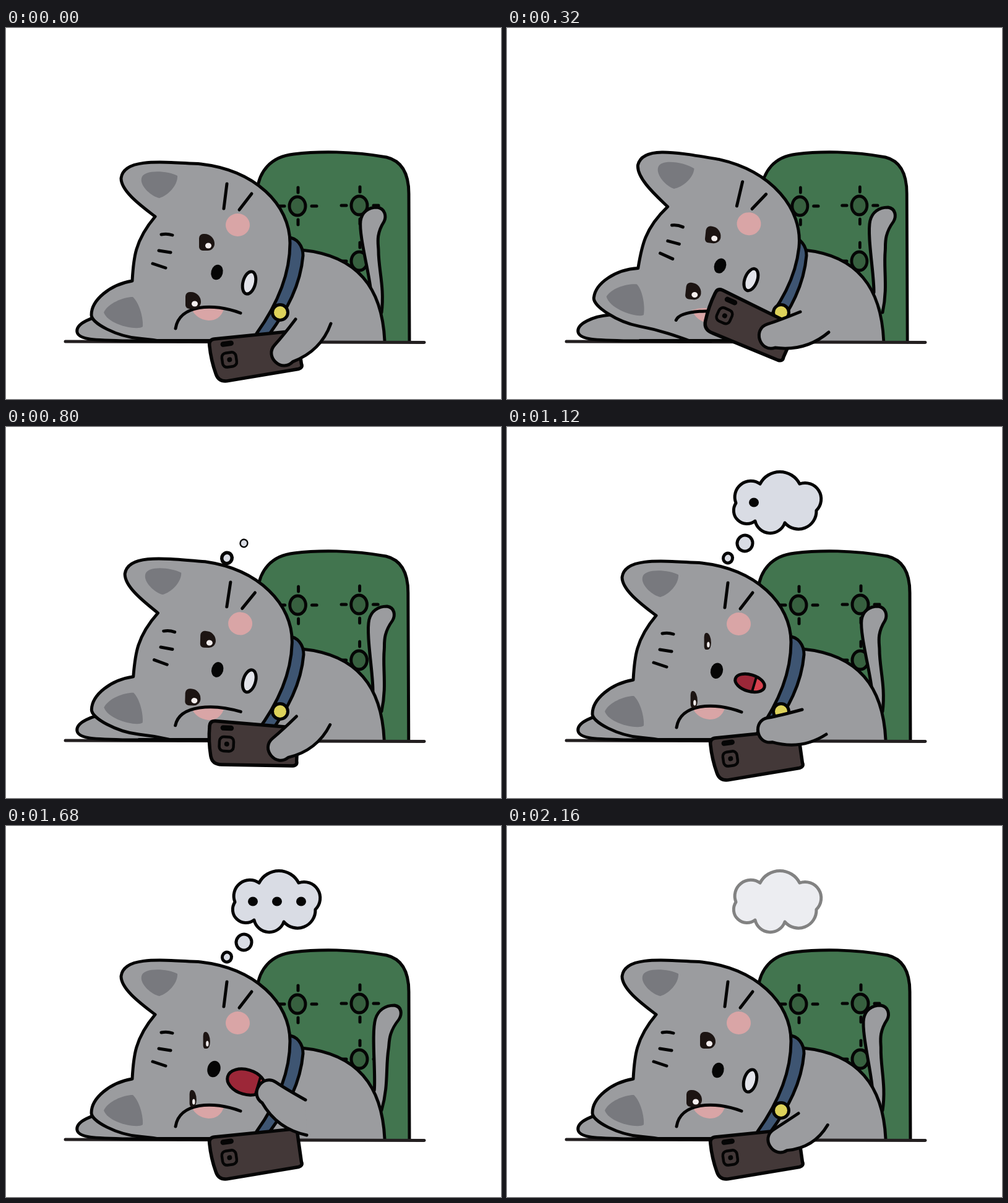
Write an HTML page with a canvas that moves like this. It is 800x600 px and loops after 2240 ms.

```html
<!DOCTYPE html>
<html lang="en">
<head>
<meta charset="utf-8">
<title>Sleepy cat</title>
<style>
html, body { margin: 0; width: 100%; height: 100%; overflow: hidden; background: #fff; }
canvas { display: block; }
</style>
</head>
<body>
<canvas id="stage" width="800" height="600"></canvas>
<script>
const LOOP = 2240, STEP = 80, TAU = Math.PI * 2;
const INK = '#050505', FUR = '#9b9c9f', EAR = '#78797e', GREEN = '#42754f', MOSS = '#37603f',
  BLUE = '#3e5572', GOLD = '#ddd25a', CASE = '#433838', MIST = '#d9dce4', PINK = '#d9a5a6';
const c = document.getElementById('stage').getContext('2d');

const ramp = (t, from, to) => Math.min(1, Math.max(0, (t - from) / (to - from)));
const mix = (a, b, u) => a + (b - a) * u;

// Grows from 0 to 1 within 200 ms, slightly overshooting
function pop(t, start) {
  const u = ramp(t, start, start + 200);
  return u && 1 + 2.7 * (u - 1) ** 3 + 1.7 * (u - 1) ** 2;
}

function paint(path, fill, width = 5) {
  if (fill) { c.fillStyle = fill; c.fill(path); }
  if (width) { c.strokeStyle = INK; c.lineWidth = width; c.stroke(path); }
}
const shape = (d, fill, width) => paint(new Path2D(d), fill, width);

function oval(x, y, rx, ry, fill, width = 0, turn = 0) {
  const p = new Path2D();
  p.ellipse(x, y, rx, ry, turn, 0, TAU);
  paint(p, fill, width);
  return p;
}

function box(x, y, w, h, radius, fill, width) {
  const p = new Path2D();
  p.roundRect(x, y, w, h, radius);
  paint(p, fill, width);
}

function group(draw) { c.save(); draw(); c.restore(); }

function scaleAt(x, y, sx, sy) {
  c.translate(x, y);
  c.scale(sx, sy);
  c.translate(-x, -y);
}

function button(x, y) {
  oval(x, y, 13, 15, MOSS, 5);
  for (let i = 0; i < 4; i++) group(() => {
    c.translate(x + 1, y);
    c.rotate(i * TAU / 4);
    shape('M22 0h8');
  });
}

function chair() {
  shape('M652 508L651 268C651 235 640 215 615 209C560 199 505 199 465 204C427 208 409 233 406 262V508', GREEN);
  button(471, 288);
  button(571, 287);
  button(571, 377);
}

function tail(sway) {
  // Lean grows with height above the base
  c.transform(1, 0, -sway / 160, 1, sway * 460 / 160, 0);
  shape('M590 428C588 400 570 335 573 312C575 298 585 290 600 290C613 292 615 305 611 313' +
    'C597 335 602 350 602 360C602 390 612 420 607 460', FUR);
}

function body() {
  const back = 'M478 359C568 368 608 420 612 506';
  shape(back + 'H400L440 355Z', FUR, 0);
  shape(back);
}

function eye(x, y, open) {
  c.translate(x, y);
  c.scale(open, 1);
  box(-12, -14, 25, 27, [7, 16, 11, 6], '#1c1412', 0);
  oval(3, 5, 5, 4.5, '#f4eeee');
}

function mouth(yawn) {
  if (yawn < .2) return oval(393, 412, 10, 18.5, '#e3e4ea', 5, .26);
  const rx = 20 + 11 * yawn, ry = 9 + 11 * yawn, edge = 21.5 * yawn - 1.5;
  c.translate(395.7 - 7.7 * yawn, 414);
  c.rotate(.29);
  group(() => {
    c.clip(oval(0, 0, rx, ry, '#9c2738'));
    shape(`M${edge}-40h60v80h-60Z`, '#d8424f', 0);
    shape(`M${edge}-40v80`, null, 4);
  });
  oval(0, 0, rx, ry, null, 5);
}

function head(lean, yawn, open) {
  // Everything below the table top is hidden
  c.beginPath();
  c.rect(0, 0, 800, 507);
  c.clip();
  c.translate(400, 472);
  c.rotate(.1065 * lean);
  c.translate(-400, -472);
  shape('M241 305C222 290 186 265 186 243C190 211 245 216 315 220C402 230 459 285 459 348C459 395 440 445 405 494' +
    'L400 530L330 524C300 518 265 506 215 502C180 499 138 478 138 464C138 440 168 415 204 409C206 375 207 345 241 305Z', FUR);
  shape('M219 243C222 228 262 231 277 239C278 254 262 271 248 275C236 273 216 256 219 243Z', EAR, 0);
  shape('M158 460C165 445 190 435 205 435C216 445 222 470 221 483C212 490 165 480 158 460Z', EAR, 0);
  shape('M357 252L352 292M397 268L377 294M251 334Q260 332 269 335M247 360L266 363M237 381L258 388');
  oval(374.5, 318.5, 19.5, 18.5, PINK);
  group(() => {
    c.translate(-2 * lean, 12 * lean);
    shape('M300 455Q325 444 352 455Q346 473 327 473Q308 471 300 455Z', PINK, 0);
  });
  shape(`M274 486C280 ${447 + 20 * lean} 335 ${444 + 20 * lean} 379 461`);
  c.translate(-5.5 * lean, -4 * lean);
  group(() => eye(324, 347, open));
  group(() => eye(302, 441, open));
  oval(341 - 5 * yawn, 395 - 2 * yawn, 9.5 + yawn, 12.5 + yawn, INK, 0, .25);
  group(() => mouth(yawn));
}

function phone(raise) {
  c.translate(403 - 13 * raise, 531 - 48 * raise);
  c.rotate((-8 + 32 * raise) * Math.PI / 180);
  shape('M-62-37L66-32Q72-31 72-25V22Q74 29 66 30L-48 33Q-64 34-67 20Q-72-4-71-28Q-71-37-62-37Z', CASE, 5.5);
  shape('M-49-26.5h13', null, 8.5);
  box(-54, -12, 23, 23, 7, null, 4.5);
  oval(-42, -.5, 4, 4, INK);
}

function bubble(x, y, r, size, alpha) {
  c.globalAlpha = alpha;
  c.translate(x, y);
  c.scale(size, size);
  if (size) oval(0, 0, r, r + .5, MIST, 5, .3);
}

function cloud(size, alpha) {
  if (!size) return;
  scaleAt(438, 122, size, size);
  // Each lobe is an arc [end x, end y, radius]
  const lobes = [[409, 92, 26], [473, 92, 36], [500, 135, 26], [449, 155, 29], [401, 152, 25], [370, 123, 21.5]];
  shape('M370 123' + lobes.map(([x, y, r]) => `A${r} ${r} 0 0 1 ${x} ${y}`).join('') + 'Z', MIST);
  c.globalAlpha = 1 - alpha;
  c.fillStyle = '#fff';
  c.fillRect(350, 60, 180, 120);
}

function thought(t) {
  group(() => bubble(357, 212, 7.5, pop(t, 680), 1 - ramp(t, 1680, 1920)));
  group(() => bubble(384.5, 188, 12.5, pop(t, 776), 1 - ramp(t, 1920, 2080)));
  group(() => cloud(pop(t, 880), 1 - ramp(t, 2080, 2240)));
  for (let i = 0; i < 3; i++)
    if (t >= 1120 + 160 * i && t < 1760 + 120 * i) oval(399 + 39 * i, 122, 8, 7.5, INK);
}

// [time, upper end x, y, paw centre x, y, lower end x, y]
const REACH = [
  [0, 468, 471, 449, 526, 525, 478],
  [320, 474, 459, 427, 498, 520, 492],
  [560, 474, 459, 427, 498, 520, 492],
  [880, 468, 471, 449, 526, 525, 478],
  [1120, 477, 457, 425, 490, 516, 497],
  [1440, 484, 443, 425, 431, 486, 500],
  [1680, 484, 443, 425, 431, 486, 500],
  [1920, 480, 446, 420, 453, 498, 500],
  [LOOP, 468, 471, 449, 526, 525, 478]
];

// A round paw whose two sides run back to the ends of the sleeve
function paw(t) {
  const i = REACH.findIndex(k => k[0] > t), from = REACH[i - 1], to = REACH[i];
  const u = ramp(t, from[0], to[0]);
  const [, ax, ay, x, y, bx, by] = from.map((v, j) => mix(v, to[j], u));
  const angle = Math.atan2(y - (ay + by) / 2, x - (ax + bx) / 2);
  const r = 20, dx = r * Math.cos(angle), dy = r * Math.sin(angle);
  const ux = x - dy, uy = y + dx, lx = x + dy, ly = y - dx;
  const p = new Path2D();
  p.moveTo(ax, ay);
  p.quadraticCurveTo(ux - dx, uy - dy, ux, uy);
  p.bezierCurveTo(ux + dx * 1.3, uy + dy * 1.3, lx + dx * 1.3, ly + dy * 1.3, lx, ly);
  p.quadraticCurveTo((lx + bx) / 2 + dy, (ly + by) / 2 - dx, bx, by);
  paint(p, FUR);
}

function draw(t) {
  const lean = ramp(t, 0, 320) - ramp(t, 560, 880);
  const yawn = ramp(t, 900, 1440) - ramp(t, 1720, 2120);
  const open = 1 - .55 * (ramp(t, 880, 1120) - ramp(t, 1680, 2000));
  const sway = 26 * (1 - Math.abs(t % 1120 / 560 - 1));
  const squeeze = 1 - .04 * lean;
  c.fillStyle = '#fff';
  c.fillRect(0, 0, 800, 600);
  c.lineCap = c.lineJoin = 'round';
  group(() => { scaleAt(531, 0, squeeze, 1); chair(); });
  group(() => tail(sway));
  group(() => { scaleAt(531, 0, squeeze, 1); body(); });
  group(() => {
    c.translate(4 * lean, 0);
    shape('M456 339C470 339 480 352 480 368C476 415 455 455 425 496L400 497L440 420Z', BLUE);
  });
  c.strokeStyle = '#231f20';
  c.lineWidth = 5;
  c.stroke(new Path2D('M96 507L676 508.5'));
  shape('M166 464C140 466 112 478 115 492C118 504 140 505 200 506H330', FUR);
  group(() => head(lean, yawn, open));
  shape('M215 505.5H395');
  oval(443, 460, 12.5, 12.5, GOLD, 5);
  group(() => phone(lean ** .8));
  paw(t);
  thought(t);
}

function tick() {
  draw(Math.floor(performance.now() % LOOP / STEP) * STEP);
  requestAnimationFrame(tick);
}
tick();
</script>
</body>
</html>
```
